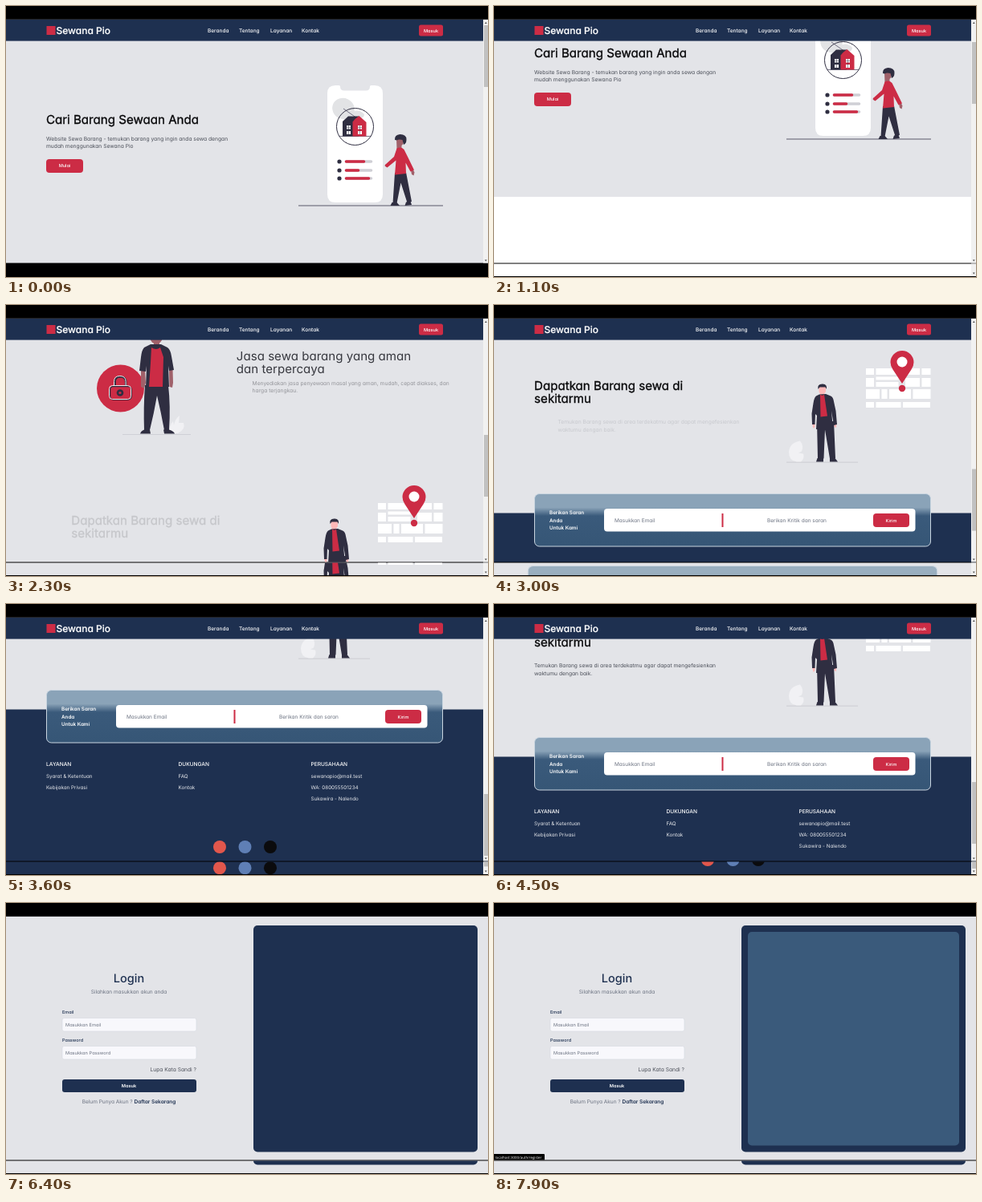
An HTML page for the animation above (8000 ms loop, 600 by 338 pixels).

```html
<!DOCTYPE html>
<html lang="id">
<head>
<meta charset="utf-8">
<title>Sewana Pio</title>
<style>
  html, body { margin: 0; width: 100%; height: 100%; overflow: hidden; background: #000; }
  #stage { display: block; width: 100vw; height: 100vh; }
  text { font: 400 6.5px Inter, "Open Sans", sans-serif; font-feature-settings: "cv11"; text-rendering: geometricPrecision; }
  .mid { text-anchor: middle; }
  .end { text-anchor: end; }
  .h { font-size: 15.1px; font-weight: 400; fill: #08080a; stroke: #08080a; stroke-width: .35; }
  .title2 .h { fill: #2e2f36; stroke: none; }
  .p { font-size: 6.7px; fill: #4b4f59; }
  .desc2 .p { fill: #1c1d24; }
  .nav { font-size: 6.5px; font-weight: 500; fill: #fff; }
  .btn { font-size: 5.6px; font-weight: 500; fill: #fff; }
  .side { font-size: 6.3px; font-weight: 600; fill: #fff; }
  .hint { fill: #6b7280; }
  .cap { font-size: 6.6px; font-weight: 500; fill: #fff; }
  .link { font-size: 6.3px; fill: #e5e7eb; }
  .label { font-size: 5.5px; font-weight: 500; fill: #1e3050; }
  .tip { font: 4.4px "Open Sans", sans-serif; fill: #fff; }
  .navy { fill: #1e3050; }
  .red { fill: #cc2c45; }
  .ink { fill: #2f2e41; }
  .skin { fill: #a0616a; }
  .pale { fill: #ffb8b8; }
  .white { fill: #fff; }
  .bg { fill: #e3e4e8; }
</style>
</head>
<body>
<svg id="stage" viewBox="0 0 600 338" preserveAspectRatio="none">
  <defs>
    <clipPath id="window"><rect y="17" width="600" height="303.500"/></clipPath>
    <clipPath id="below"><rect y="321.500" width="600" height="15.500"/></clipPath>
    <linearGradient id="glass" x2="0" y2="1">
      <stop offset=".26" stop-color="#8aa3b8"/>
      <stop offset=".42" stop-color="#3a5a7b"/>
      <stop offset="1" stop-color="#365676"/>
    </linearGradient>
  </defs>
  <rect width="600" height="338"/>
  <rect y="16" width="600" height="1" fill="#242426"/>

  <g clip-path="url(#window)">
    <g class="view">
      <g class="site">
        <g class="page">
          <rect class="bg" y="17" width="600" height="304"/>
          <rect class="white" y="321" width="600" height="204"/>
          <rect class="bg" y="525" width="600" height="448"/>

          <!-- hero -->
          <text class="h" x="50" y="147">Cari Barang Sewaan Anda</text>
          <text class="p" x="50" y="167.800">Website Sewa Barang - temukan barang yang ingin anda sewa dengan</text>
          <text class="p" x="50" y="177.300">mudah menggunakan Sewana Pio</text>
          <rect class="red" x="50" y="191" width="46" height="17" rx="4"/>
          <text class="btn mid" x="73" y="201.400">Mulai</text>

          <path class="white" d="M410 99h4.500q1.500 0 1.500 1.500q0 5 5 5h27q5 0 5-5q0-1.500 1.500-1.500h4.500q10 0 10 10v126q0 10-10 10h-49q-10 0-10-10v-126q0-10 10-10z"/>
          <ellipse cx="420" cy="128" rx="14" ry="13" fill="#e2e3e5" transform="rotate(25 420 128)"/>
          <path d="M429 133q10-6 17 2q0 5-6 5q-8 0-11-7z" fill="#e2e3e5"/>
          <circle cx="434.500" cy="150.500" r="23" fill="none" stroke="#2f2e41"/>
          <path d="M420 128l17 12M415 162.500h39" stroke="#3f3d56" stroke-width=".7"/>
          <path class="ink" d="M419 162.500V144l7-6.500h13V162.500z"/>
          <path class="red" d="M431.500 162.500V144.500l3-3.500 5-4 9 8v17.500z"/>
          <path class="white" d="M424 149h5v4.500h-5zM424 156h5v4h-5zM438 149h5v4.500h-5zM438 156h5v4h-5z"/>
          <path d="M426.500 149v11M424 151.300h5M440.500 149v11M438 151.300h5" stroke="#2f2e41" stroke-width=".5"/>
          <path d="M423.500 194h31M423.500 205h31M423.500 215h31" stroke="#cfcfd5" stroke-width="3.600" stroke-linecap="round"/>
          <path d="M423.500 194h22M423.500 205h15M423.500 215h28" stroke="#cc2c45" stroke-width="3.600" stroke-linecap="round"/>
          <path d="M415 194h0M415 205h0M415 215h0" stroke="#2f2e41" stroke-width="5.200" stroke-linecap="round"/>
          <rect x="364" y="248.500" width="180" height="1" fill="#5b5a6c"/>

          <path class="skin" d="M486 166h8.500v6l-2 2v5h-6z"/>
          <path class="ink" d="M484 167q-.5-6.500 6.500-7q8 0 8 6.500q0 5-3.500 6.500l-1.500-6q-5-1-7 .5z"/>
          <path class="skin" d="M473 197l-1.500 2.500 2 1.500 2-2.500zM504 205l1 5 2.500 1.500 1-4-2-4z"/>
          <path class="ink" d="M484 208l14-.5 7 36.500-5.500 1.500-8-25-5 25.500h-5z"/>
          <path class="red" d="M486.500 177.500q5-2.500 9 1.500l5 10 7.500 15.500-4.500 2-6-11 .5 13.500-14 1.500 1.500-18-11 9-3-3 11.500-10.500z"/>
          <path class="ink" d="M480.500 245h6l3.500 4h-11.500zM498 244.500l5.500-1 1.500 4.500-8.500 1z"/>

          <!-- safety -->
          <g transform="translate(0 545)">
            <circle class="red" cx="142.500" cy="104" r="29.500"/>
            <path d="M135.500 101v-5q0-6.500 6.800-6.500t6.800 6.500v5" fill="none" stroke="#2f2e41" stroke-width="2.600"/>
            <path d="M134.500 100v-4.500q0-7 7.300-7t7.300 7v4.500" fill="none" stroke="#fff" stroke-width=".9"/>
            <rect x="129.500" y="101.500" width="26.500" height="16.500" rx="4" fill="#cc2c45" stroke="#2f2e41" stroke-width="1.500"/>
            <rect x="128.500" y="100.500" width="27" height="17" rx="4" fill="none" stroke="#fff" stroke-width=".9"/>
            <circle class="ink" cx="142" cy="109.500" r="4.300"/>
            <circle class="red" cx="142" cy="109.500" r="1.600"/>
            <rect x="145" y="161" width="85" height=".8" fill="#cbccd3"/>
            <path d="M205 160q-3-9 3-15l1 5q2-9 7-12l-1 9 6 0q3 8-7 13z" fill="#f1f1f4"/>
            <circle class="skin" cx="187" cy="41" r="7.500"/>
            <path class="ink" d="M179 42q0-13 8-13t8 13z"/>
            <path class="skin" d="M184 46h7v7h-7zM168 80h5l1 17-2 7-4-2zM203 80h4.500l.5 17-1 6-3.500-1z"/>
            <path class="ink" d="M173 100h29q3 26 1 56h-6q-4-22-9-43-4 23-9 43h-7q-1-29 1-56z"/>
            <path class="ink" d="M180 49l-8 4q-3 3-4 12l-2 17 8 1 1-7-1 27 10-1 14 0 5 0-1-26 1 6 6-1-3-17q-1-8-5-11l-8-4z"/>
            <path class="red" d="M181 53q6 4 11 0l4 12-1 37h-17l2-30z"/>
            <path class="ink" d="M172 155.500h7l1 5h-13q1-3.500 5-5zM196 155.500h7q6 2 7 5h-13z"/>
          </g>
          <g class="title2">
            <text class="h" x="285" y="614">Jasa sewa barang yang aman</text>
            <text class="h" x="285" y="630">dan terpercaya</text>
          </g>
          <g class="desc2">
            <text class="p" x="285" y="644.700">Menyediakan jasa penyewaan masal yang aman, mudah, cepat diakses, dan</text>
            <text class="p" x="285" y="654.200">harga terjangkau.</text>
          </g>

          <!-- nearby -->
          <g transform="translate(0 713)">
            <path class="white" d="M463 79h10v8h-10zM475.500 79h27v8h-27zM513 79h17v8h-17zM532.500 79h11v8h-11zM463 91h10v11h-10zM475.500 89.500h28v4h-28zM475.500 96h28v6h-28zM512 91h18v11h-18zM532.500 91h11v11h-11zM463 105h17v12h-17zM482.500 105h7v12h-7zM492 105h27v12h-27zM521.500 105h22v12h-22zM463 121h10v7h-10zM475.500 121h31v7h-31zM509 121h34v7h-34z"/>
            <path class="red" d="M508 98l-11.500-17.500q-3-4.500-3-9a14.500 14.500 0 0 1 29 0q0 4.500-3 9z"/>
            <circle class="white" cx="508" cy="71" r="6.500"/>
            <circle class="red" cx="508" cy="104" r="4.200"/>
            <rect x="364" y="195.700" width="89" height=".8" fill="#c6c7ce"/>
            <path d="M377 195.500q-10-1-10-12q1-12 14-14q5 6 2 13l-4 2 6 1q2 6-3 10z" fill="#f1f1f4"/>
            <path class="pale" d="M404.500 101h8.500v7l-2 3v3h-5v-3l-1.500-3zM396 148h3.500v4l-2 2zM423 147h3.500l-.5 6-2.500-1z"/>
            <path class="ink" d="M403.500 105q-1.500-6.500 5-6.500q6.500-.5 5.500 6.500l-1.500-2.500h-7z"/>
            <path class="ink" d="M402 145h21l2 46-7 .5-6-36-1.500 36h-7.500z"/>
            <path class="ink" d="M405 111.500l-4 2q-2.500 2-3.500 9l-2 13 .5 13.500h3.500l.5-13 2 2-1 17h21l-2-23 3 18 4-1-1.500-17-3-14q-1-4-4.500-5l-5-2z"/>
            <path class="red" d="M406 111.500q3 2.500 5 0l4 27-8.500 1z"/>
            <path class="ink" d="M402.500 191h7.500v4.500h-9zM418 191h6.500l3.500 4.500h-10z"/>
          </g>
          <g class="title3">
            <text class="h" x="50" y="819.300">Dapatkan Barang sewa di</text>
            <text class="h" x="50" y="835.200">sekitarmu</text>
          </g>
          <g class="desc3">
            <text class="p" x="50" y="861">Temukan Barang sewa di area terdekatmu agar dapat mengefesienkan</text>
            <text class="p" x="50" y="870.600">waktumu dengan baik.</text>
          </g>

          <!-- footer -->
          <rect class="navy" y="972.500" width="600" height="192"/>
          <g transform="translate(0 782)">
            <text class="cap" x="50" y="261.200">LAYANAN</text>
            <text class="link" x="50" y="276">Syarat &amp; Ketentuan</text>
            <text class="link" x="50" y="290">Kebijakan Privasi</text>
            <text class="cap" x="214.500" y="261.200">DUKUNGAN</text>
            <text class="link" x="214.500" y="276">FAQ</text>
            <text class="link" x="214.500" y="290">Kontak</text>
            <text class="cap" x="379.500" y="261.200">PERUSAHAAN</text>
            <text class="link" x="379.500" y="276">sewanapio@mail.test</text>
            <text class="link" x="379.500" y="290">WA: 080055501234</text>
            <text class="link" x="379.500" y="304">Sukawira - Nalendo</text>
            <circle cx="266" cy="362" r="8" fill="#e2574c"/>
            <circle cx="297.500" cy="362" r="8" fill="#5f7fb5"/>
            <circle cx="329" cy="362" r="8" fill="#0b0b0d"/>
          </g>

          <g class="card">
            <rect x="50.500" y="948.500" width="493" height="65.500" rx="6" fill="url(#glass)" stroke="#c9d5e0"/>
            <g transform="translate(0 713.500)">
              <text class="side" x="69" y="260.500">Berikan Saran</text>
              <text class="side" x="69" y="270">Anda</text>
              <text class="side" x="69" y="279.500">Untuk Kami</text>
              <rect class="white" x="137" y="253.500" width="387.500" height="28.500" rx="4"/>
              <text class="hint" x="150" y="270">Masukkan Email</text>
              <rect class="red" x="283.500" y="259.500" width="2" height="17"/>
              <text class="hint" x="340" y="270">Berikan Kritik dan saran</text>
              <rect class="red" x="472" y="259.500" width="45" height="17" rx="4"/>
              <text class="btn mid" x="494.500" y="270">Kirim</text>
            </g>
          </g>
        </g>

        <rect class="navy" y="17" width="594" height="26.600"/>
        <rect class="red" x="50.500" y="25" width="11" height="11"/>
        <text x="62.500" y="35" style="font-size:12px;font-weight:500" fill="#fff" stroke="#fff" stroke-width=".2">Sewana Pio</text>
        <text class="nav" x="251" y="33.200">Beranda</text>
        <text class="nav" x="290" y="33.200">Tentang</text>
        <text class="nav" x="329" y="33.200">Layanan</text>
        <text class="nav" x="368" y="33.200">Kontak</text>
        <rect class="red" x="514" y="23.600" width="30" height="14" rx="2.500"/>
        <text class="btn mid" x="529" y="32.600">Masuk</text>

        <rect x="594" y="17" width="6" height="304" fill="#f1f1f1"/>
        <rect class="thumb" x="595" y="24" width="5" height="77" fill="#c1c1c1"/>
        <path d="M595.800 22l1.500-2 1.500 2zM595.800 316.500l1.500 2 1.500-2z" fill="#505050"/>
      </g>

      <g class="login">
        <rect class="bg" y="17" width="600" height="304"/>
        <text class="mid" x="153" y="98.500" style="font-size:14.5px;font-weight:500" fill="#1e3050">Login</text>
        <text class="hint mid" x="153" y="113">Silahkan masukkan akun anda</text>
        <text class="label" x="70" y="138.200">Email</text>
        <text class="label" x="70" y="173.300">Password</text>
        <g fill="#f8f8fc" stroke="#d5d8e0" stroke-width=".6">
          <rect x="70" y="143.500" width="167" height="16.500" rx="2.500"/>
          <rect x="70" y="178.500" width="167" height="16.500" rx="2.500"/>
        </g>
        <text class="hint" x="74" y="154" style="font-size:5.7px">Masukkan Email</text>
        <text class="hint" x="74" y="189" style="font-size:5.7px">Masukkan Password</text>
        <text class="p end" x="237" y="209.800">Lupa Kata Sandi ?</text>
        <rect class="navy" x="70" y="220" width="167" height="16" rx="3"/>
        <text class="btn mid" x="153" y="230" style="font-weight:600">Masuk</text>
        <text class="hint mid" x="153" y="250.400">Belum Punya Akun ? <tspan font-weight="600" fill="#1e3050">Daftar Sekarang</tspan></text>
        <rect class="navy" x="308" y="28" width="279" height="282.500" rx="5"/>
        <rect class="inner" x="316" y="36" width="263" height="266.500" rx="5" fill="#3a5a7b"/>
      </g>

      <g class="tipLogin">
        <path d="M0 313h57.500q1 0 1 1v7H0z"/>
        <text class="tip" x="1.500" y="318.600">localhost:3000/auth/login</text>
      </g>
      <g class="tipRegister">
        <path d="M0 313h62q1 0 1 1v7H0z"/>
        <text class="tip" x="1.500" y="318.600">localhost:3000/auth/register</text>
      </g>
    </g>
  </g>

  <g id="strip" clip-path="url(#below)"><g transform="translate(0 16)"></g></g>
</svg>
<script>
  const LOOP = 8000, STEP = 100;
  const stops = [
    [0, 0], [600, 18], [1000, 55], [1100, 83], [1600, 330], [2100, 515], [2200, 533],
    [2300, 545], [2500, 555], [2800, 585], [2900, 638], [3000, 713], [3200, 800],
    [3600, 841], [4400, 841], [4500, 782], [4700, 760], [5200, 752.5]
  ];
  const fades = { title2: 1680, desc2: 2120, title3: 2246, desc3: 2925 };

  const strip = document.getElementById('strip');
  const main = document.querySelector('.view');
  const lagged = main.cloneNode(true);
  strip.firstChild.append(lagged);

  const progress = (t, start, length) => Math.min(1, Math.max(0, (t - start) / length));
  const easeOut = x => 1 - (1 - x) ** 2;

  function scrollAt(t) {
    const i = stops.findIndex(s => s[0] > t);
    if (i < 0) return stops[stops.length - 1][1];
    const [t0, y0] = stops[i - 1], [t1, y1] = stops[i];
    return y0 + (y1 - y0) * (t - t0) / (t1 - t0);
  }

  function render(view, t) {
    const part = name => view.querySelector('.' + name);
    const move = (name, value) => part(name).setAttribute('transform', value);
    const show = (name, on) => part(name).setAttribute('display', on ? 'inline' : 'none');
    const y = scrollAt(t);

    move('page', `translate(0 ${-y})`);
    move('thumb', `translate(0 ${y * 213 / 841})`);
    for (const name in fades) {
      const p = easeOut(progress(t, fades[name], 800));
      move(name, `translate(${36 * (1 - p)} 0)`);
      part(name).setAttribute('opacity', p);
    }
    const zoom = progress(t, 2400, 600);
    move('card', `translate(297 981) scale(${1.2 - .2 * zoom}) translate(-297 -981)`);
    part('card').setAttribute('opacity', zoom);

    const login = t >= 6200;
    show('site', !login);
    show('login', login);
    show('inner', t >= 6600);
    show('tipLogin', t >= 5600 && !login);
    show('tipRegister', t >= 7900);
  }

  function tick() {
    const t = Math.floor(performance.now() % LOOP / STEP) * STEP;
    render(main, t);
    render(lagged, Math.max(0, t - STEP));
    strip.setAttribute('display', t ? 'inline' : 'none');
    requestAnimationFrame(tick);
  }
  tick();
</script>
</body>
</html>
```
